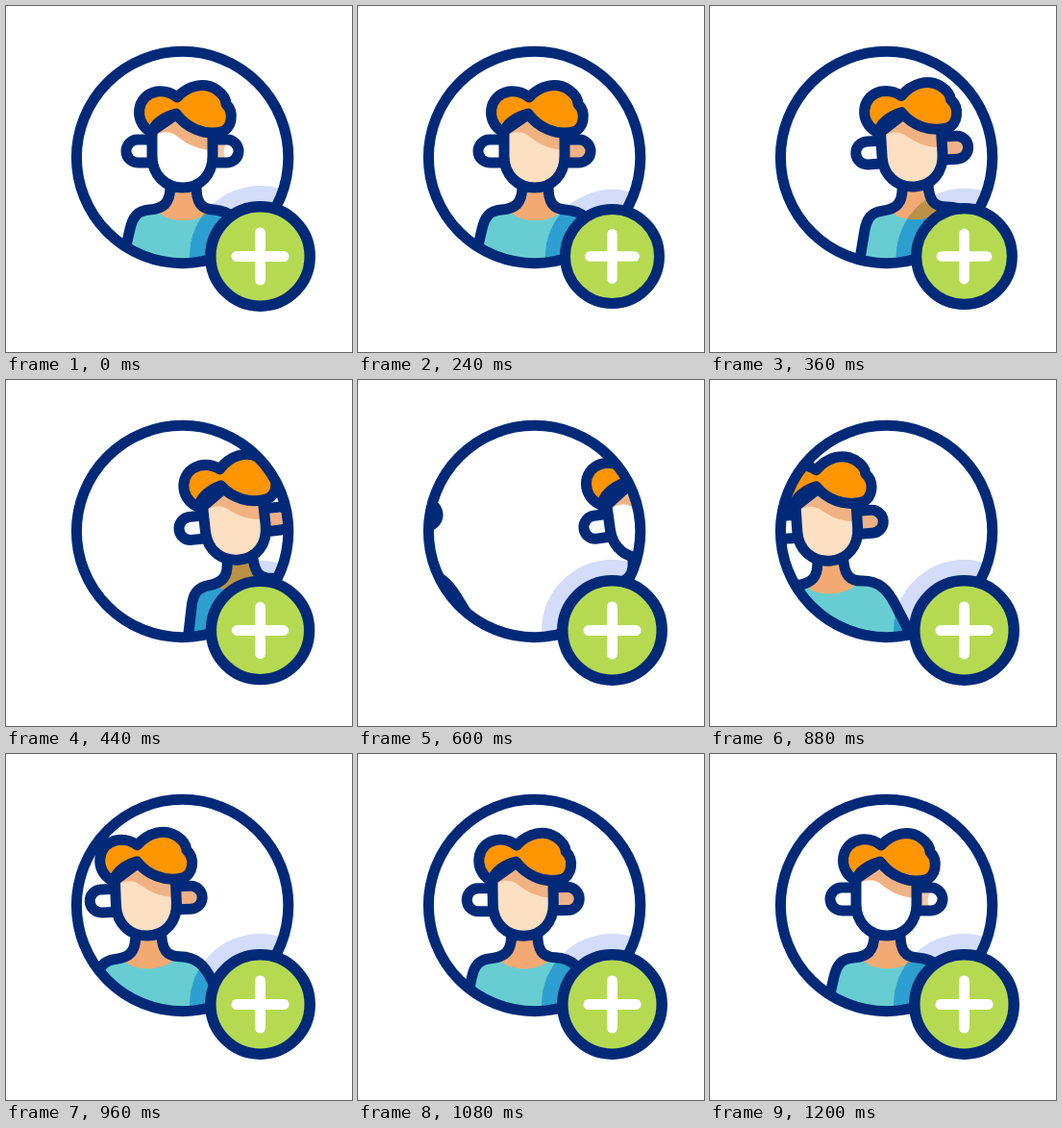
Animation of 360x360 px, one loop 1.48 s. Source, as an HTML page with a canvas:

```html
<!DOCTYPE html>
<html lang="en">
<head>
<meta charset="utf-8">
<title>Add user</title>
<style>
  html, body { margin: 0; width: 100%; height: 100%; overflow: hidden; background: #fff; }
  canvas { display: block; }
</style>
</head>
<body>
<canvas id="stage" width="360" height="360"></canvas>
<script>
const ctx = document.getElementById('stage').getContext('2d');
const LOOP = 1480, STEP = 40, SPACING = 268;
const NAVY = '#002a78', HAIR = '#ff9500', SKIN = '#f2aa72', PEACH = '#fddfc1', WHITE = '#fff';
const SHIRT = '#68cdd2', SHIRT_SHADE = '#2c9fd0', SKIN_SHADE = '#bb9145', SHADE = '#d3dcf8';

const shape = {
  body: new Path2D('M118 280 L129 232 C132 219 137 213 149 212 C163 211 171 206 171 187 H198 C198 205 203 211 216 212 C234 213 242 223 249 239 L267 280 Z'),
  neck: new Path2D('M171 187 C171 206 166 210 157 212 C166 227 203 227 212 212 C201 209 198 203 198 187 Z'),
  outline: new Path2D('M118 280 L129 232 C132 219 137 213 149 212 C163 211 171 206 171 187 M198 187 C198 205 203 211 216 212 C234 213 242 223 249 239 L267 280'),
  leftEar: new Path2D('M150 139 H137 A12 12 0 0 0 137 163 H150'),
  rightEar: new Path2D('M217 139 H230 A12 12 0 0 1 230 163 H217'),
  earShade: new Path2D('M218 143 H229 Q225 152 228 159 H218 Z'),
  face: new Path2D('M152 130 V156 C152 176 166 189 184 189 C202 189 215 176 215 156 V130 L177 113 Z'),
  brow: new Path2D('M156 134 L177 114 L214 132 V150 C195 149 185 141 176 134 C169 130 162 131 156 134 Z'),
  hair: new Path2D('M149 130 C133 120 135 93 157 89 C166 88 173 91 178 95 C190 82 207 79 219 87 C226 92 229 97 229 102 C238 111 235 128 224 131 C205 135 187 126 177 112 C165 115 154 122 152 132 Z'),
};

// Time, travel, tilt in degrees, lift
const KEYS = [
  [240, 0, 0, 0],
  [440, 68, 6.4, 2.5],
  [600, 126, 8, 5.5],
  [760, 176, 6, 3],
  [960, 235, 2.3, 0],
  [1200, SPACING, 0, 0],
];

function slope(i, col) {
  const a = KEYS[i - 1], b = KEYS[i + 1];
  return a && b ? (b[col] - a[col]) / (b[0] - a[0]) : 0;
}

// Cubic Hermite curve through the keys
function track(t, col) {
  const last = KEYS.length - 1;
  if (t <= KEYS[0][0]) return KEYS[0][col];
  if (t >= KEYS[last][0]) return KEYS[last][col];
  const i = KEYS.findIndex(key => key[0] > t) - 1;
  const a = KEYS[i], b = KEYS[i + 1], span = b[0] - a[0];
  const u = (t - a[0]) / span, v = 1 - u;
  return a[col] * v * v * (1 + 2 * u) + b[col] * u * u * (3 - 2 * u)
    + span * u * v * (slope(i, col) * v - slope(i + 1, col) * u);
}

function disc(x, y, r) {
  const path = new Path2D();
  path.arc(x, y, r, 0, 2 * Math.PI);
  return path;
}

function fill(path, color) {
  ctx.fillStyle = color;
  ctx.fill(path);
}

function stroke(path, color = NAVY, width = 11) {
  ctx.strokeStyle = color;
  ctx.lineWidth = width;
  ctx.stroke(path);
}

function within(path, draw) {
  ctx.save();
  ctx.clip(path);
  draw();
  ctx.restore();
}

function pose(x, tilt, lift, draw) {
  ctx.save();
  ctx.translate(184 + x, 270 - lift);
  ctx.rotate(-tilt * Math.PI / 180);
  ctx.translate(-184, -270);
  draw();
  ctx.restore();
}

function person(x, tilt, lift, shadow, t) {
  const moving = t >= 240 && t < 1200;
  const tinted = moving && (t < 520 || t > 820);
  const torso = (shirt, skin) => pose(x, tilt, lift, () => {
    fill(shape.body, shirt);
    fill(shape.neck, skin);
  });
  torso(SHIRT, SKIN);
  within(shadow, () => torso(SHIRT_SHADE, SKIN_SHADE));

  pose(x, tilt, lift, () => {
    stroke(shape.outline);
    fill(shape.leftEar, WHITE);
    fill(shape.rightEar, moving ? '#f0b186' : WHITE);
    if (!moving) fill(shape.earShade, '#f6c8a6');
    stroke(shape.leftEar);
    stroke(shape.rightEar);
    fill(shape.face, tinted ? PEACH : WHITE);
    fill(shape.brow, '#f1b283');
    stroke(shape.face);
    ctx.translate(-0.6 * tilt, -0.3 * tilt);
    fill(shape.hair, HAIR);
    stroke(shape.hair);
  });
}

function badge(scale) {
  ctx.save();
  ctx.translate(264.5, 260.5);
  ctx.scale(scale, scale);
  const ring = disc(0, 0, 51.7);
  fill(ring, '#b5da52');
  stroke(ring, NAVY, 11.5);
  stroke(new Path2D('M-24.5 0 H24.5 M0 -24.5 V24.5'), WHITE);
  ctx.restore();
}

function render(t) {
  const press = t < 520 ? Math.sin(Math.PI * t / 520) ** 2 : 0;
  const scale = 1 - 0.053 * press;
  const frame = disc(183.6, 157.5, 110.2);
  const shadow = disc(264.5, 260.5, 73.5 * scale);
  const [x, tilt, lift] = [1, 2, 3].map(col => track(t, col));

  ctx.fillStyle = WHITE;
  ctx.fillRect(0, 0, 360, 360);
  ctx.lineCap = ctx.lineJoin = 'round';
  within(frame, () => {
    fill(shadow, SHADE);
    person(x, tilt, lift, shadow, t);
    person(x - SPACING, tilt, lift, shadow, t);
  });
  stroke(frame);
  badge(scale);
}

const start = performance.now();
function tick() {
  const t = (performance.now() - start) % LOOP;
  render(Math.floor(t / STEP) * STEP);
  requestAnimationFrame(tick);
}
tick();
</script>
</body>
</html>
```
